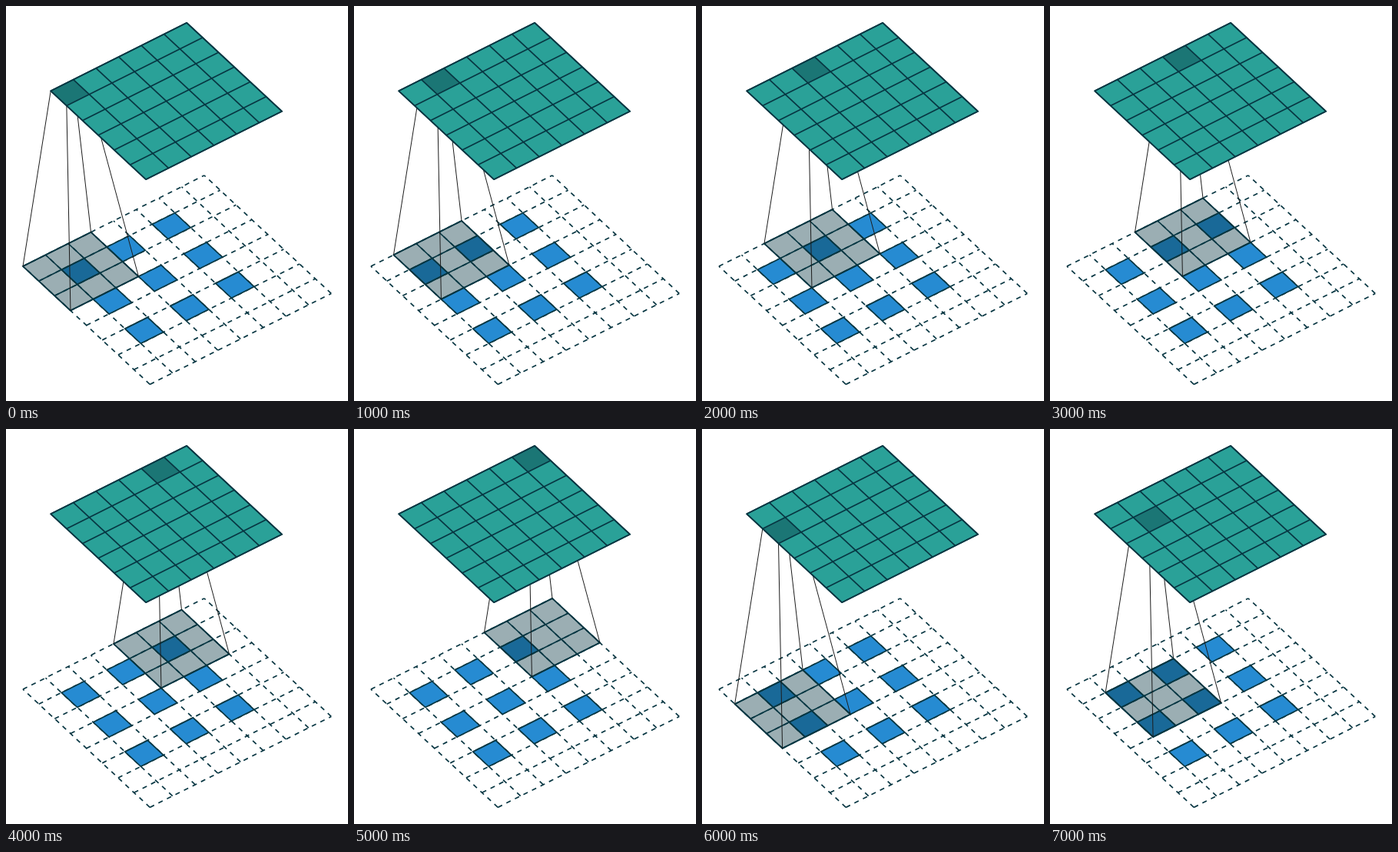
Write an HTML page with a canvas that moves like this. It is 445x513 px and loops after 8 s.

```html
<!DOCTYPE html>
<html lang="en">
<head>
<meta charset="utf-8">
<title>Transposed convolution</title>
<style>
  html, body { margin: 0; width: 100%; height: 100%; overflow: hidden; background: #fff; }
  canvas { display: block; width: 445px; height: 513px; }
</style>
</head>
<body>
<canvas id="stage" width="445" height="513"></canvas>
<script>
const ctx = document.getElementById('stage').getContext('2d');
const INK = '#073642', BLUE = '#268bd2', TEAL = '#2aa198';
const SHADE = 'rgba(7, 54, 66, 0.4)';
const UNIT = 29.5, LINE = 1.7, DASH = 6.2;
const STEP = 1000, STEPS = 8;
const OUT = 6, IN = 8, KERNEL = 3;

// Slanted plane: x runs up-right, y runs down-right from the left corner.
const plane = (left, top) => (x, y) => [
  left + UNIT * (x + 0.7 * y),
  top + UNIT * (0.65 * y - 0.5 * x)
];
const upper = plane(58.2, 110.3);
const lower = plane(22, 338);

const corners = (x, y, size) => [[x, y], [x, y + size], [x + size, y], [x + size, y + size]];

function line(from, to) {
  ctx.beginPath();
  ctx.moveTo(...from);
  ctx.lineTo(...to);
  ctx.stroke();
}

function square(at, x, y, size, fill, outlined) {
  ctx.beginPath();
  ctx.moveTo(...at(x, y));
  ctx.lineTo(...at(x + size, y));
  ctx.lineTo(...at(x + size, y + size));
  ctx.lineTo(...at(x, y + size));
  ctx.closePath();
  ctx.fillStyle = fill;
  ctx.fill();
  if (outlined) ctx.stroke();
}

function grid(at, x, y, size) {
  for (let k = 0; k <= size; k++) {
    line(at(x + k, y + size), at(x + k, y));
    line(at(x, y + k), at(x + size, y + k));
  }
}

function draw(step) {
  const x = step % OUT, y = Math.floor(step / OUT);
  ctx.fillStyle = '#fff';
  ctx.fillRect(0, 0, 445, 513);
  ctx.strokeStyle = INK;
  ctx.lineWidth = LINE;
  ctx.lineCap = 'butt';
  ctx.lineJoin = 'miter';

  ctx.setLineDash([DASH, DASH]);
  grid(lower, 0, 0, IN);
  ctx.setLineDash([]);
  for (let j = 1; j < 6; j += 2)
    for (let i = 1; i < 6; i += 2) square(lower, i, j, 1, BLUE, true);

  square(lower, x, y, KERNEL, SHADE, true);
  grid(lower, x, y, KERNEL);

  // The upper plate covers the far ends of these lines.
  ctx.strokeStyle = '#1c1c1c';
  ctx.lineWidth = 1;
  const ends = corners(x, y, KERNEL);
  corners(x, y, 1).forEach((c, k) => line(upper(...c), lower(...ends[k])));

  ctx.strokeStyle = INK;
  ctx.lineWidth = LINE;
  square(upper, 0, 0, OUT, TEAL, true);
  square(upper, x, y, 1, SHADE, false);
  grid(upper, 0, 0, OUT);
}

const start = performance.now();
function tick() {
  draw(Math.floor((performance.now() - start) / STEP) % STEPS);
  requestAnimationFrame(tick);
}
tick();
</script>
</body>
</html>
```
